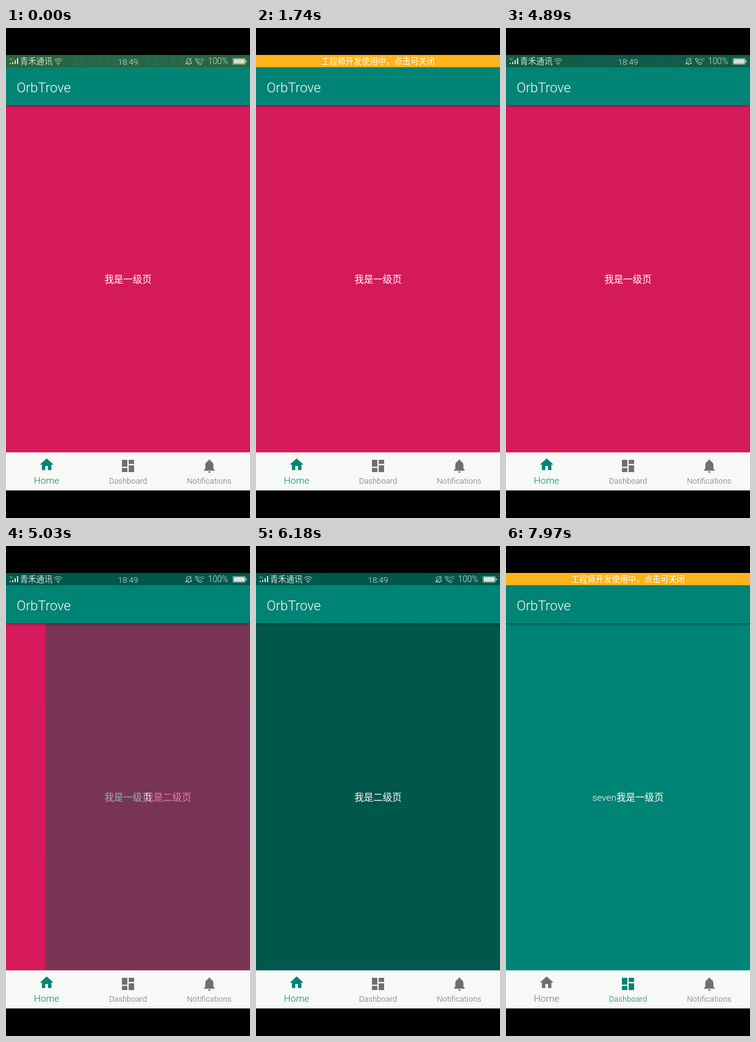
Animation, 400 px wide and 800 px high, one loop 7.99 s. Source, as an HTML page:

```html
<!DOCTYPE html>
<html lang="zh-CN">
<head>
<meta charset="utf-8">
<title>Tabs and pages</title>
<style>
  html, body { margin: 0; width: 100%; height: 100%; overflow: hidden; background: #000; }
  svg { display: block; width: 400px; height: 800px; }
  text { font-family: Roboto, "Noto Sans CJK SC", "Noto Sans CJK", sans-serif; font-weight: 300; }
  .cjk { font-family: "Noto Sans CJK SC", "Noto Sans CJK", sans-serif; }
  .mid { text-anchor: middle; }
  .page text { font-size: 15.5px; fill: #fff; text-anchor: middle; }
  .label { font-size: 13.1px; text-anchor: middle; }
  .status { fill: #d3e6df; font-size: 13.3px; }
  .line { fill: none; stroke: #d3e6df; stroke-width: .9; stroke-linecap: round; stroke-linejoin: round; }
</style>
</head>
<body>
<svg viewBox="0 0 400 800">
  <defs>
    <linearGradient id="shade" x2="0" y2="1">
      <stop offset="0" stop-color="#000" stop-opacity=".28"/>
      <stop offset="1" stop-color="#000" stop-opacity="0"/>
    </linearGradient>
    <clipPath id="view"><rect y="126" width="400" height="567"/></clipPath>
  </defs>
  <rect width="400" height="800"/>

  <g clip-path="url(#view)">
    <g class="page" id="first">
      <rect y="126" width="400" height="567" fill="#d51a5c"/>
      <text class="cjk" x="200" y="416">我是一级页</text>
    </g>
    <g class="page" id="second">
      <rect y="126" width="400" height="567" fill="#00574b"/>
      <text class="cjk" x="200" y="416">我是二级页</text>
    </g>
    <g class="page" id="third">
      <rect y="126" width="400" height="567" fill="#008475"/>
      <text x="200" y="416">seven<tspan class="cjk">我是一级页</tspan></text>
    </g>
    <rect y="126" width="400" height="5" fill="url(#shade)"/>
  </g>

  <rect y="64" width="400" height="62" fill="#008475"/>
  <text x="17.5" y="105" font-size="22.2" fill="#fff">OrbTrove</text>

  <rect y="44" width="400" height="20" fill="#00574b"/>
  <g class="status">
    <text x="5" y="53" font-size="5.5">4G</text>
    <path d="M6 57h2v2H6zM10 55.5h2V59h-2zM14 52.5h2V59h-2zM18 49h2v10h-2z"/>
    <text class="cjk" x="23" y="59">青禾通讯</text>
    <path class="line" d="M79 52.5q6.5-5.5 13 0M81 55q4.500-3.800 9 0M83 57.3q2.500-2 5 0"/>
    <circle cx="85.5" cy="59" r="1"/>
    <text class="mid" x="200" y="59.5" font-size="13.6">18:49</text>
    <path class="line" d="M295 58h9.5l-1.500-2v-3q-.5-3.500-3.500-3.500t-3.500 3.500v3zM298.5 59.5h2M304.5 49l-10 10.500"/>
    <path class="line" d="M310.5 50.5l2-1.500 2.300 3-1.300 1.600q1.300 2.300 3.600 3.400l1.600-1.300 2.700 2-1.600 2q-7-.3-9.300-9.200z"/>
    <text x="316" y="53.5" font-size="7">HD</text>
    <text x="331" y="59" font-size="13.8">100%</text>
    <rect class="line" x="371.5" y="49.5" width="21" height="10" rx="1" opacity=".55"/>
    <path d="M373 50.5h18.500v8H373zM393 53h1.500v3H393z"/>
  </g>
  <g id="banner">
    <rect y="44" width="400" height="20" fill="#ffb31a"/>
    <text class="cjk mid" x="200" y="59" font-size="13.3" fill="#fff">工程师开发使用中，点击可关闭</text>
  </g>

  <rect y="692.8" width="400" height="62.2" fill="#f7f9f6"/>
  <g id="home">
    <path transform="translate(53.3 699.5) scale(1.111)" d="M10 20v-6h4v6h5v-8h3L12 3 2 12h3v8z"/>
    <text class="mid" x="66.5" y="744.2" font-size="15.5">Home</text>
  </g>
  <g id="dash">
    <path transform="translate(186.7 701.7) scale(1.111)" d="M3 13h8V3H3v10zm0 8h8v-6H3v6zm10 0h8V11h-8v10zm0-18v6h8V3h-8z"/>
    <text class="label" x="200" y="744.2">Dashboard</text>
  </g>
  <g fill="#6f6f6f">
    <path transform="translate(320 701.7) scale(1.111)" d="M12 22c1.100 0 2-.9 2-2h-4c0 1.100.89 2 2 2zm6-6v-5c0-3.070-1.640-5.640-4.500-6.320V4c0-.83-.67-1.500-1.500-1.500s-1.500.67-1.500 1.500v.68C7.630 5.360 6 7.920 6 11v5l-2 2v1h16v-1l-2-2z"/>
    <text class="label" x="333" y="744.2">Notifications</text>
  </g>
</svg>
<script>
  const LOOP = 7990, TAB_AT = 6800;
  const SLIDE = { start: 4902, time: 300 };
  const ACTIVE = "#008475", IDLE = "#6f6f6f";
  const el = id => document.getElementById(id);
  const [first, second, third, banner, home, dash] =
    ["first", "second", "third", "banner", "home", "dash"].map(el);

  const part = (t, start, time) => Math.min(1, Math.max(0, (t - start) / time));
  const show = (node, on) => node.setAttribute("visibility", on ? "visible" : "hidden");

  // The banner appears quickly at first and leaves slowly at first.
  const rise = (t, start) => 1 - (1 - part(t, start, 1400)) ** 1.5;
  const fall = (t, start) => 1 - part(t, start, 1450) ** 1.5;

  function bannerAlpha(t) {
    if (t < 3500) return rise(t, -145);
    if (t < 6000) return fall(t, 3500);
    return rise(t, 6360);
  }

  function draw(t) {
    const p = part(t, SLIDE.start, SLIDE.time);
    const switched = t >= TAB_AT;
    banner.setAttribute("opacity", bannerAlpha(t));
    show(first, !switched);
    show(second, !switched && p > 0);
    show(third, switched);
    second.setAttribute("opacity", p);
    second.setAttribute("transform", `translate(${200 * (1 - p) ** 2} 0)`);
    home.setAttribute("fill", switched ? IDLE : ACTIVE);
    dash.setAttribute("fill", switched ? ACTIVE : IDLE);
  }

  const began = performance.now();
  function tick() {
    draw((performance.now() - began) % LOOP);
    requestAnimationFrame(tick);
  }
  tick();
</script>
</body>
</html>
```
